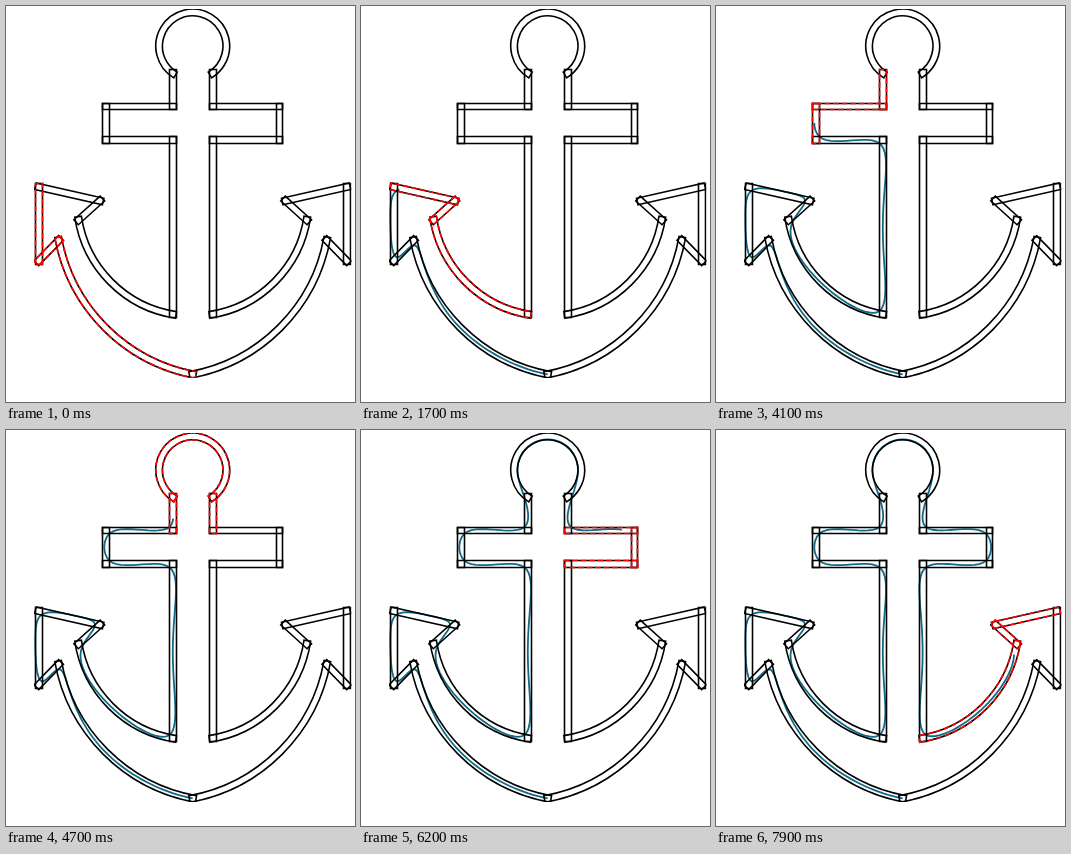
An HTML page with a canvas for the animation above (8 s loop, 349x396 px).

```html
<!DOCTYPE html>
<html lang="en">
<head>
<meta charset="utf-8">
<title>Anchor corridor</title>
<style>
  html, body { margin: 0; width: 100%; height: 100%; overflow: hidden; background: #fff; }
  canvas { display: block; width: 349px; height: 396px; }
</style>
</head>
<body>
<canvas id="stage"></canvas>
<script>
const W = 349, H = 396, LOOP = 8000, STEP = 100;
const HALF = 3.35, MIRROR = 373.4, WINDOW = 3;

const canvas = document.getElementById('stage');
const ctx = canvas.getContext('2d');
const ratio = window.devicePixelRatio || 1;
canvas.width = W * ratio;
canvas.height = H * ratio;

// Left half from the bottom tip up to the ring: x, y, bulge of the next segment
// (bulge = tan of a quarter of the arc's angle, none for a straight line)
const left = [
  [186.7, 368.4, 0.303], [52.7, 234.4], [32.7, 254.8], [32.7, 180.9], [93.9, 194.8],
  [72.6, 214, -0.315], [166.7, 308.4], [166.7, 133.9], [99.9, 133.9], [99.9, 100.5],
  [166.7, 100.5], [166.7, 67.1, 3.03]
];
const last = 2 * left.length - 2;
const nodes = left.concat([...left].reverse().map(([x, y]) => [MIRROR - x, y]));

// Each segment knows its length, its outline and the point and heading at a fraction f
function line([x0, y0], [x1, y1]) {
  const length = Math.hypot(x1 - x0, y1 - y0);
  const ux = (x1 - x0) / length, uy = (y1 - y0) / length;
  const upright = Math.abs(ux * uy) < 1e-9;
  const snap = v => upright ? Math.floor(v) + 0.5 : v;
  const band = new Path2D();
  const corner = (x, y, along, side) => band.lineTo(
    snap(x + HALF * (along * ux - side * uy)),
    snap(y + HALF * (along * uy + side * ux)));
  corner(x0, y0, -1, 1);
  corner(x1, y1, 1, 1);
  corner(x1, y1, 1, -1);
  corner(x0, y0, -1, -1);
  band.closePath();
  const at = f => ({ x: x0 + (x1 - x0) * f, y: y0 + (y1 - y0) * f, ux, uy });
  return { length, band, at };
}

function arc([x0, y0], [x1, y1], bulge) {
  const sweep = 4 * Math.atan(bulge), sign = Math.sign(sweep);
  const chord = Math.hypot(x1 - x0, y1 - y0);
  const r = chord / 2 / Math.abs(Math.sin(sweep / 2));
  const k = 0.5 / Math.tan(sweep / 2);
  const cx = (x0 + x1) / 2 - (y1 - y0) * k;
  const cy = (y0 + y1) / 2 + (x1 - x0) * k;
  const start = Math.atan2(y0 - cy, x0 - cx);
  const a = start - sign * HALF / r, b = start + sweep + sign * HALF / r;
  const band = new Path2D();
  band.arc(cx, cy, r + HALF, a, b, sign < 0);
  band.arc(cx, cy, r - HALF, b, a, sign > 0);
  band.closePath();
  const at = f => {
    const c = Math.cos(start + sweep * f), s = Math.sin(start + sweep * f);
    return { x: cx + r * c, y: cy + r * s, ux: -sign * s, uy: sign * c };
  };
  return { length: r * Math.abs(sweep), band, at };
}

const segments = nodes.slice(1).map((q, i) => {
  const bulge = left[Math.min(i, last - i)][2];
  return bulge ? arc(nodes[i], q, bulge) : line(nodes[i], q);
});

// Centreline samples with travelled distance
const SPACING = 5;
const centre = [];
let distance = 0;
for (const seg of segments) {
  seg.start = distance;
  const count = Math.round(seg.length / SPACING);
  for (let j = 0; j < count; j++) {
    centre.push({ ...seg.at(j / count), s: distance + seg.length * j / count });
  }
  distance += seg.length;
}

// Driven path: an elastic rod pulled to the centreline and kept between the walls
function relax(rounds, pull) {
  const path = centre.map(({ x, y, s }) => ({ x, y, s }));
  const clamp = v => Math.max(-HALF, Math.min(HALF, v));
  for (let n = 0; n < rounds; n++) {
    for (let i = 2; i < path.length - 2; i++) {
      const c = centre[i];
      const rest = k => (4 * (path[i - 1][k] + path[i + 1][k])
        - path[i - 2][k] - path[i + 2][k] + pull * c[k]) / (6 + pull);
      const dx = rest('x') - c.x, dy = rest('y') - c.y;
      const along = clamp(dx * c.ux + dy * c.uy);
      const side = clamp(dy * c.ux - dx * c.uy);
      path[i].x = c.x + along * c.ux - side * c.uy;
      path[i].y = c.y + along * c.uy + side * c.ux;
    }
  }
  return path;
}
const path = relax(1200, 0.003);

// Time and distance; tight corners are slower
const keys = [
  [0, 0], [1700, 308], [2800, 480], [4100, 795], [5500, 1020], [7000, 1336], [7900, 1584]
];

function travelled(t) {
  const i = Math.max(1, keys.findIndex(k => k[0] >= t));
  const [t0, s0] = keys[i - 1], [t1, s1] = keys[i];
  return s0 + (s1 - s0) * (t - t0) / (t1 - t0);
}

function strokeTrail(s) {
  const i = path.findIndex(p => p.s > s);
  const a = path[i - 1], b = path[i];
  const f = (s - a.s) / (b.s - a.s);
  ctx.beginPath();
  path.slice(0, i).forEach(p => ctx.lineTo(p.x, p.y));
  ctx.lineTo(a.x + (b.x - a.x) * f, a.y + (b.y - a.y) * f);
  ctx.stroke();
}

function pen(color, width, dash = []) {
  ctx.strokeStyle = color;
  ctx.lineWidth = width;
  ctx.setLineDash(dash);
}

function draw(t) {
  const s = travelled(t);
  const current = segments.filter(seg => seg.start <= s).length - 1;

  ctx.setTransform(ratio, 0, 0, ratio, 0, 0);
  ctx.fillStyle = '#fff';
  ctx.fillRect(0, 0, W, H);
  ctx.save();
  ctx.beginPath();
  ctx.rect(28, 3, 317.5, 369);
  ctx.clip();

  pen('#0f6a86', 1.8);
  strokeTrail(s);
  pen('#000', 1.6);
  segments.forEach(seg => ctx.stroke(seg.band));
  pen('#f00', 1.6, [5.9, 2.6]);
  segments.slice(current, current + WINDOW).forEach(seg => ctx.stroke(seg.band));
  ctx.restore();
}

const begin = performance.now();
function tick() {
  const t = (performance.now() - begin) % LOOP;
  draw(Math.floor(t / STEP) * STEP);
  requestAnimationFrame(tick);
}
tick();
</script>
</body>
</html>
```
